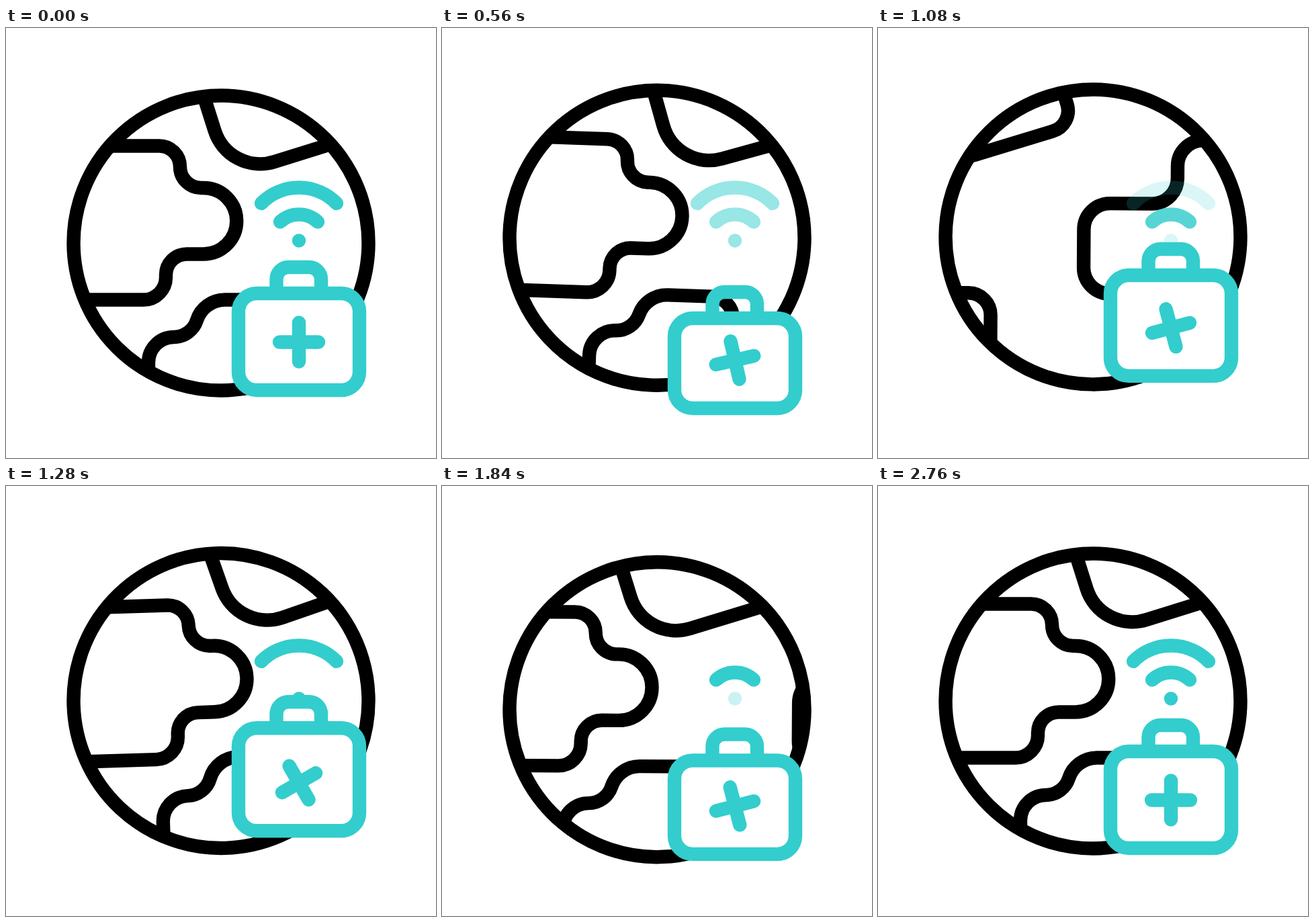
An HTML page that plays this animation: 640 by 640 pixels, repeating every 3 s.

```html
<!DOCTYPE html>
<html lang="en">
<head>
<meta charset="utf-8">
<title>Global medical aid</title>
<style>
html, body { margin: 0; width: 100%; height: 100%; overflow: hidden; background: #fff; }
svg { display: block; width: 100vw; height: 100vh; }
path, circle, rect { fill: none; stroke-width: 20.4; }
.ink { stroke: #000; }
.teal { stroke: #33cdcd; stroke-linecap: round; }
#dot { fill: #33cdcd; stroke: none; }
#body { fill: #fff; }
</style>
</head>
<body>
<svg viewBox="0 0 640 640">
  <defs>
    <clipPath id="disc"><circle cx="320" cy="320" r="222"/></clipPath>
    <g id="lands" class="ink">
      <path d="M123 175.5H228a31 31 0 0 1 31 31a31.5 31.5 0 0 0 31.5 31.5H294a49.2 49.2 0 0 1 0 98.5H269a31 31 0 0 0-31 31V371a33.5 33.5 0 0 1-33.5 33.5H-15a39 39 0 0 1-39-39V309a39 39 0 0 1 39-39H47a38 38 0 0 0 38-38V213.5a38 38 0 0 1 38-38z"/>
      <path d="M285 72L310.5 152.5A71 71 0 0 0 399.7 199L515 163A32 32 0 0 0 536 123L519 69"/>
      <path d="M212 560V498a38 38 0 0 1 38-38a36 36 0 0 0 34-25a44 44 0 0 1 41.5-30.5H391a33 33 0 0 1 33 33V560"/>
    </g>
  </defs>
  <g id="globe">
    <g clip-path="url(#disc)">
      <g id="map">
        <use href="#lands"/>
        <use href="#lands" x="616"/>
        <use href="#lands" x="1232"/>
      </g>
    </g>
    <circle class="ink" cx="320" cy="320" r="219.5"/>
  </g>
  <path id="outer" class="teal" d="M380 261A78.5 78.5 0 0 1 492 261"/>
  <path id="mid" class="teal" d="M408 288.5A41 41 0 0 1 464 288.5"/>
  <circle id="dot" cx="436" cy="316.5" r="10.2"/>
  <path id="handle" class="teal" d="M402.5 395V374a18 18 0 0 1 18-18H451a18 18 0 0 1 18 18V395"/>
  <rect id="body" class="teal" x="346" y="395" width="180" height="144" rx="27"/>
  <path id="cross" class="teal" d="M-29 0H29M0-29V29"/>
</svg>
<script>
const LOOP = 3000, STEP = 40, END = 2760, WRAP = 616;
const el = id => document.getElementById(id);
const clamp = (x, lo, hi) => Math.min(hi, Math.max(lo, x));

// Eased rise from 0 to 1 between two times.
function ramp(t, from, to) {
  const x = clamp((t - from) / (to - from), 0, 1);
  return x * x * (3 - 2 * x);
}

// Rises to 1 at peak, swings to the other side every half ms, then comes to rest.
function sway(t, start, peak, half, swings, rest) {
  const phase = clamp((t - peak) / half, 0, swings);
  const fade = ramp(t, peak + half * swings, rest);
  return ramp(t, start, peak) * Math.cos(Math.PI * phase) * (1 - fade);
}

// Winds up, travels to the goal, overshoots it and settles.
function whirl(t, start, go, stop, windup, goal, over) {
  return windup * ramp(t, start, go)
    + (goal + over - windup) * ramp(t, go, stop)
    - over * ramp(t, stop, END);
}

const move = (id, value) => el(id).setAttribute('transform', value);
const fade = (id, value) => el(id).setAttribute('opacity', value);

function drawGlobe(t) {
  const lift = -13.3 * sway(t, 200, 850, 881, 1, 2611);
  const tilt = 2.6 * sway(t, 150, 760, 700, 2, END);
  const spin = whirl(t, 0, 768, 1818, 16, -2 * WRAP, -31) % WRAP;
  move('globe', `translate(0 ${lift}) rotate(${tilt} 320 320)`);
  move('map', `translate(${spin} 0)`);
}

function drawCase(t) {
  const damping = 1 - 0.67 * ramp(t, 1220, 1900);
  const drop = 27 * damping * sway(t, 137, 545, 680, 2, 2420);
  const squash = 13 * ramp(t, 240, 700) - 22 * ramp(t, 700, 1200)
    + 18 * ramp(t, 1400, 2050) - 9 * ramp(t, 2050, END);
  const turn = whirl(t, 220, 629, 2081, -14, 360, 14);
  move('handle', `translate(0 ${drop + squash})`);
  move('cross', `translate(436 ${467.5 + drop}) rotate(${turn})`);
  el('body').setAttribute('y', 395 + drop + squash);
  el('body').setAttribute('height', 144 - squash);
}

// The middle arc blinks against the dot and the outer arc, which return in turn.
function drawSignal(t) {
  const swap = ramp(t, 420, 700) - ramp(t, 1010, 1270) + ramp(t, 1400, 1640);
  fade('mid', 1 - ramp(t, 0, 260) + swap);
  fade('dot', 1 - swap + ramp(t, 1760, 2000));
  fade('outer', 1 - swap + ramp(t, 2040, 2280));
}

const start = performance.now();
function tick() {
  const now = (performance.now() - start) % LOOP;
  const t = Math.min(END, Math.floor(now / STEP) * STEP);
  drawGlobe(t);
  drawCase(t);
  drawSignal(t);
  requestAnimationFrame(tick);
}
tick();
</script>
</body>
</html>
```
